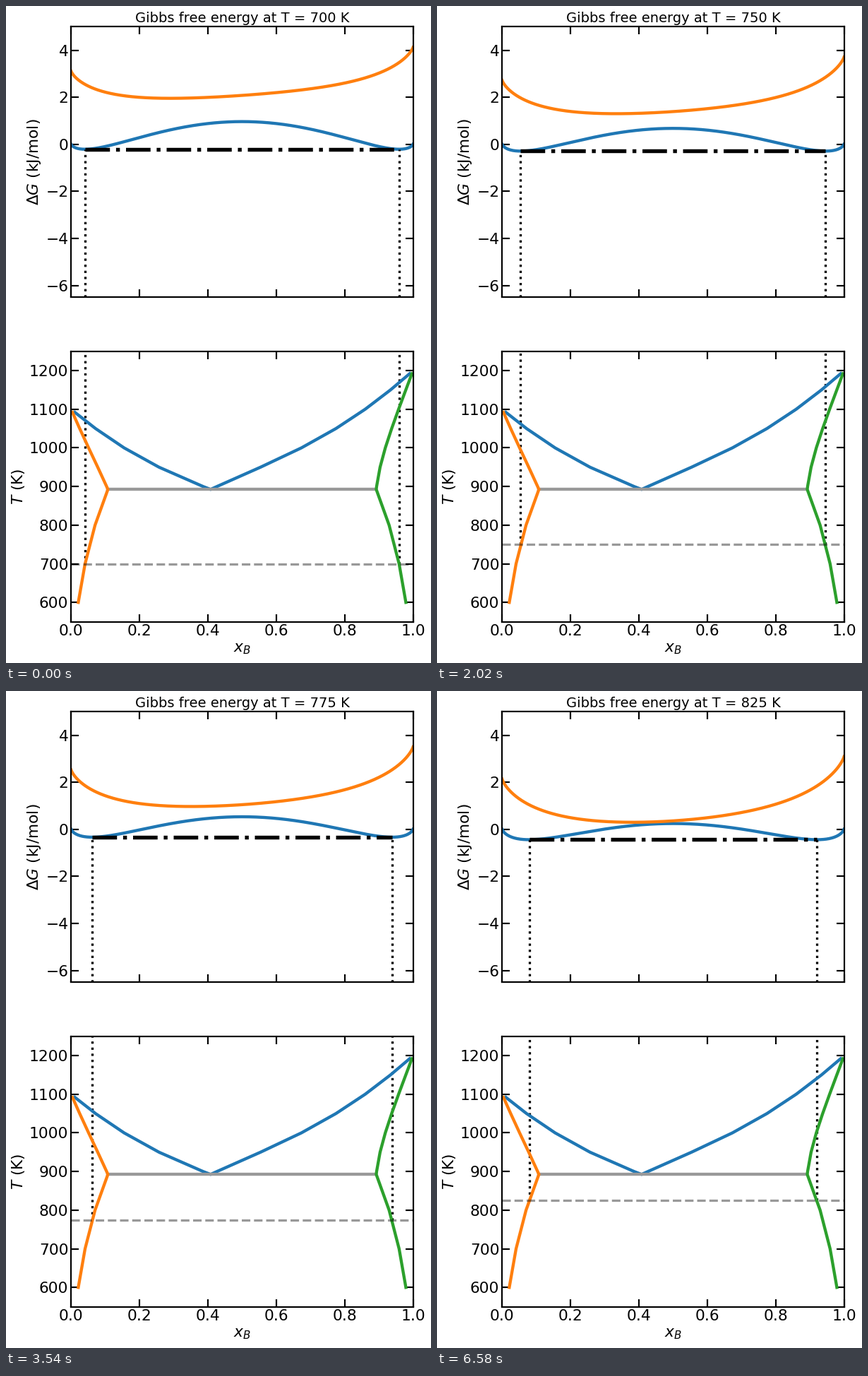
Write a matplotlib script that moves like this. It is 602 by 930 pixels and loops after 8000 ms.

```python
import numpy as np
import matplotlib.pyplot as plt
from matplotlib.animation import FuncAnimation

W, H, DPI = 602, 930, 128
PT = 78.125 / DPI          # scale of one typographic point on this stage
STEP, LOOP = 40, 8000      # ms per frame, ms per loop
HOLD, LEAD = 1520, 500     # ms per temperature, ms for the first one
R = 8.314e-3               # kJ/mol/K
TM = np.array([1100, 1200])           # melting points of A and B
S_MELT = np.array([7.77e-3, 8.24e-3])  # melting entropies

plt.rcParams.update({
    "font.family": "DejaVu Sans", "font.size": 20 * PT,
    "axes.linewidth": 2 * PT, "axes.labelpad": 4 * PT,
    "lines.linewidth": 4 * PT,
})

xs = np.linspace(1e-5, 1 - 1e-5, 2001)


def bisect(f, lo, hi):
    """Root of f, which is positive at lo and negative at hi."""
    for _ in range(40):
        mid = (lo + hi) / 2
        lo, hi = (mid, hi) if f(mid) > 0 else (lo, mid)
    return mid


def mixing(x, T, omega):
    entropy = x * np.log(x) + (1 - x) * np.log(1 - x)
    return omega * x * (1 - x) + R * T * entropy


def solid(x, T):
    return mixing(x, T, 20)


def solid_slope(x, T):
    return 20 * (1 - 2 * x) + R * T * np.log(x / (1 - x))


def liquid(x, T):
    g_a, g_b = S_MELT * (TM - T)
    return (1 - x) * g_a + x * g_b + mixing(x, T, 10)


def binodal(T):
    return bisect(lambda x: -solid_slope(x, T), 1e-4, 0.2)


def tie_line(T, rich_b):
    """Solid and liquid compositions joined by a common tangent."""
    melt = liquid(1 - xs if rich_b else xs, T)

    def gap(x):
        return melt - solid(x, T) - solid_slope(x, T) * (xs - x)

    x = bisect(lambda x: gap(x).min(), 1e-5, binodal(T))
    pair = np.array([x, xs[gap(x).argmin()]])
    return 1 - pair if rich_b else pair


def eutectic():
    T = bisect(lambda T: liquid(xs, T).min() - solid(binodal(T), T), 800, 990)
    return T, xs[liquid(xs, T).argmin()]


fig = plt.figure(figsize=(W / DPI, H / DPI), dpi=DPI, facecolor="white")


def panel(top, ylim, yticks):
    left, width, height = 92.2, 484.4, 382.8
    ax = fig.add_axes([left / W, 1 - (top + height) / H, width / W, height / H])
    ax.set(xlim=(0, 1), ylim=ylim, yticks=yticks)
    ax.set_xticks(np.linspace(0, 1, 6))
    ax.tick_params(direction="in", top=True, right=True, length=10 * PT,
                   width=2 * PT, pad=3.5 * PT)
    return ax


def dotted_pair(ax, **kw):
    return [ax.plot([], [], "k:", lw=3 * PT, **kw)[0] for _ in range(2)]


energy = panel(29.35, (-6.5, 5), range(-6, 5, 2))
phase = panel(488.75, (550, 1250), range(600, 1201, 100))
energy.tick_params(labelbottom=False)
energy.set_ylabel(r"$\Delta G$ (kJ/mol)")
phase.set_ylabel("$T$ (K)")
phase.set_xlabel("$x_B$")
title = energy.set_title("", fontsize=18 * PT, pad=6 * PT)

# Free energy curves, common tangent and drop lines
solid_line, = energy.plot([], [], color="C0")
liquid_line, = energy.plot([], [], color="C1")
tangent, = energy.plot([], [], "k-.", lw=5 * PT)
drops = dotted_pair(energy)

# Phase diagram
rises = dotted_pair(phase, zorder=1.8)
t_eut, x_eut = eutectic()
x_sol = binodal(t_eut)
phase.plot([x_sol, 1 - x_sol], [t_eut, t_eut], color="0.6")

cold = [600, 700, 800, t_eut]
gap_edge = np.array([binodal(T) for T in cold])
liquidus = []
for rich_b, edge, color in ((False, gap_edge, "C1"), (True, 1 - gap_edge, "C2")):
    hot = [*range(900, TM[int(rich_b)], 50), TM[int(rich_b)] - 8]
    x_s, x_l = np.array([tie_line(T, rich_b) for T in hot]).T
    phase.plot([*edge, *x_s], cold + hot, color=color)
    liquidus += zip(x_l, hot)
phase.plot(*zip(*sorted(liquidus + [(x_eut, t_eut)])), color="C0", zorder=1.9)
level = phase.axhline(700, color="k", alpha=0.4, ls="--", lw=3 * PT)


def update(n):
    k = (n * STEP + STEP // 2 - LEAD) // HOLD + 1
    T = 700 + 25 * k
    x = binodal(T)
    g = solid(x, T)
    solid_line.set_data(xs, solid(xs, T))
    liquid_line.set_data(xs, liquid(xs, T))
    tangent.set_data([x, 1 - x], [g, g])
    for xi, drop, rise in zip((x, 1 - x), drops, rises):
        drop.set_data([xi, xi], [-6.5, g])
        rise.set_data([xi, xi], [T, 1300])
    level.set_ydata([T, T])
    title.set_text(f"Gibbs free energy at T = {T} K")
    return [solid_line, liquid_line, tangent, level, title, *drops, *rises]


anim = FuncAnimation(fig, update, frames=LOOP // STEP, interval=STEP,
                     repeat=True, repeat_delay=0)
plt.show()
```
